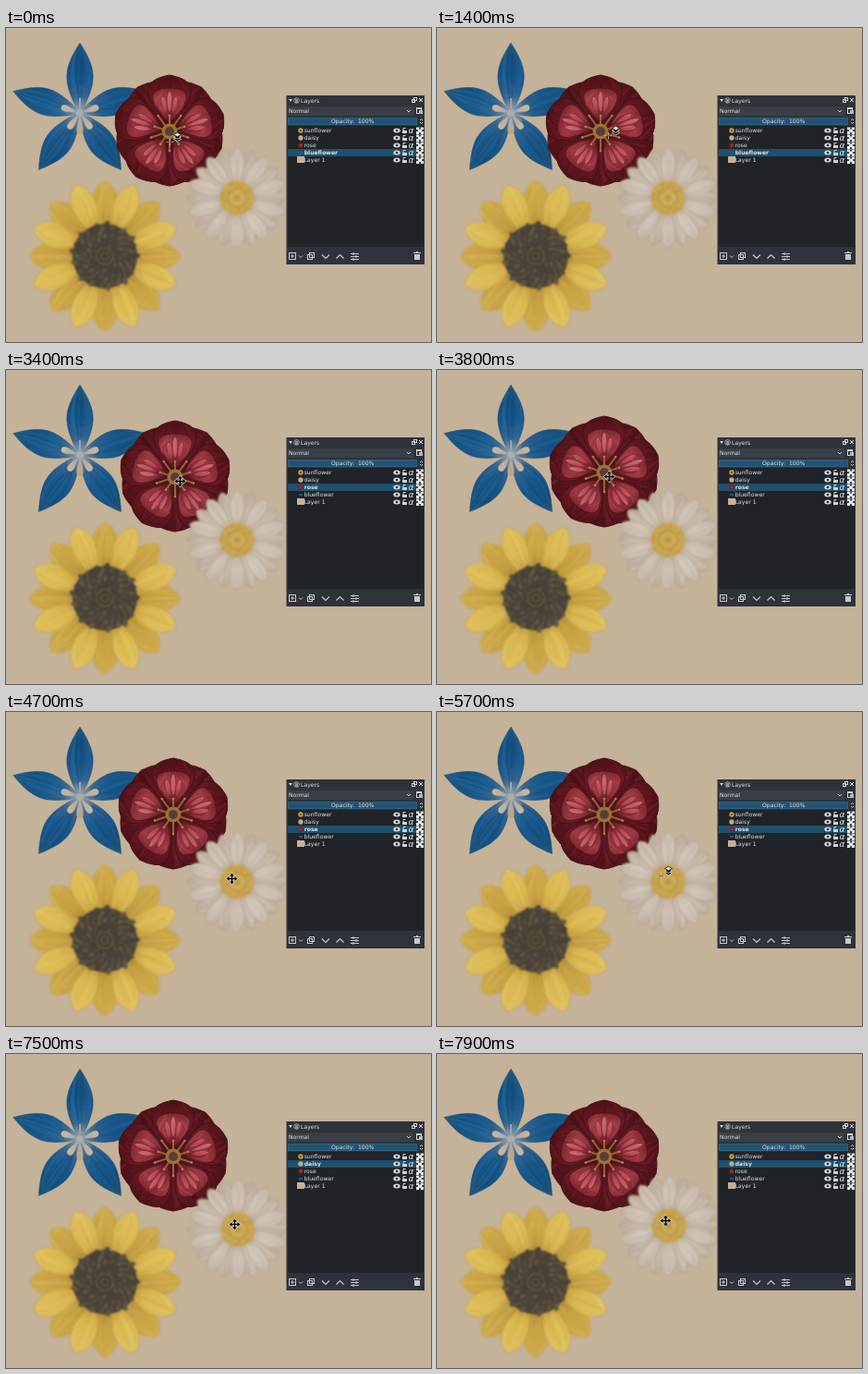
Write an HTML page with a canvas that moves like this. It is 460 px wide and 340 px high and loops after 8 s.

```html
<!DOCTYPE html>
<html lang="en">
<head>
<meta charset="utf-8">
<title>Picking and moving layers</title>
<style>
  html, body { margin: 0; width: 460px; height: 340px; overflow: hidden; background: #c4b299; }
  canvas { display: block; }
</style>
</head>
<body>
<canvas id="stage" width="460" height="340"></canvas>
<script>
const LOOP = 8000, STEP = 100, TAU = Math.PI * 2;
const ctx = document.getElementById('stage').getContext('2d');

let seed = 11;
const rnd = () => (seed = (seed * 16807) % 2147483647) / 2147483647;
const pick = list => list[Math.floor(rnd() * list.length)];

function sprite(paint, blur) {
  const c = document.createElement('canvas');
  c.width = c.height = 180;
  const g = c.getContext('2d');
  g.translate(90, 90);
  paint(g);
  const soft = c.cloneNode(), s = soft.getContext('2d');
  s.filter = `blur(${blur}px)`;
  s.drawImage(c, 0, 0);
  return soft;
}

function disc(g, x, y, r, color) {
  g.fillStyle = color;
  g.beginPath();
  g.arc(x, y, r, 0, TAU);
  g.fill();
}

function line(g, points, color, width = 1) {
  g.strokeStyle = color;
  g.lineWidth = width;
  g.beginPath();
  points.forEach(([x, y]) => g.lineTo(x, y));
  g.stroke();
}

function glow(g, r, color, clear) {
  const fill = g.createRadialGradient(0, 0, 0, 0, 0, r);
  fill.addColorStop(0, color);
  fill.addColorStop(1, clear);
  disc(g, 0, 0, r, fill);
}

// One brushed petal pointing away from the centre.
function petal(g, degrees, o) {
  const { from, to, width: w, k1 = .35, k2 = .3, neck = 0 } = o, len = to - from;
  g.save();
  g.rotate(degrees * Math.PI / 180);
  g.beginPath();
  g.moveTo(from, -neck);
  g.bezierCurveTo(from + len * k1, -w, to - len * k2, -w, to, 0);
  g.bezierCurveTo(to - len * k2, w, from + len * k1, w, from, neck);
  g.closePath();
  const fill = g.createLinearGradient(from, 0, to, 0);
  o.colors.forEach((c, i) => fill.addColorStop(i / (o.colors.length - 1), c));
  g.fillStyle = fill;
  g.fill();
  g.strokeStyle = o.edge;
  g.lineWidth = 1;
  g.stroke();
  g.clip();
  g.lineCap = 'round';
  for (let i = 0; i < o.strokes; i++) {
    const side = rnd() * 2 - 1;
    g.globalAlpha = .1 + rnd() * .25;
    g.strokeStyle = pick(o.brush);
    g.lineWidth = 1 + rnd() * 2;
    g.beginPath();
    g.moveTo(from + len * rnd() * .4, side * w * .3);
    g.quadraticCurveTo(from + len * .5, side * w, to - len * rnd() * .3, side * w * .35);
    g.stroke();
  }
  g.restore();
}

function ring(g, count, start, o) {
  for (let i = 0; i < count; i++) petal(g, start + i * 360 / count, o);
}

const blueflower = sprite(g => {
  ring(g, 5, -90, {
    from: 4, to: 76, width: 18.5, k1: .42, k2: .4, neck: 3,
    colors: ['#6b8093', '#2d6290', '#17568a', '#15507f', '#265878'],
    edge: 'rgba(40,84,115,.4)', strokes: 26,
    brush: ['#0e4475', '#1b639a', '#2e6f9c', '#1c4b74']
  });
  glow(g, 17, 'rgba(170,176,182,.95)', 'rgba(120,145,168,0)');
  for (const deg of [-18, 54, 126, 198]) {
    petal(g, deg, {
      from: 4, to: 21, width: 4.5, k1: .7, k2: 0,
      colors: ['#a5aaae', '#bfb1a0', '#cfb797'], edge: 'rgba(190,175,155,.4)', strokes: 0
    });
  }
  petal(g, 90, {
    from: 4, to: 23, width: 4.5, k1: .7, k2: 0,
    colors: ['#a5aaae', '#b9aa93', '#c2a36f'], edge: 'rgba(190,175,155,.4)', strokes: 0
  });
  line(g, [[0, -16], [0, -5]], '#9aa4ae', 2);
}, .7);

const rose = sprite(g => {
  ring(g, 5, -54, {
    from: 0, to: 59, width: 36, k1: .5, k2: .1,
    colors: ['#40101a', '#581a1f', '#5c171c', '#4e1217'], edge: '#4a1218', strokes: 22,
    brush: ['#3b0c14', '#8a333c', '#5c141c']
  });
  ring(g, 5, -90, {
    from: 6, to: 61, width: 31, k1: .6, k2: .1,
    colors: ['#4c111a', '#701d26', '#5f171d', '#4b1116'], edge: '#43101a', strokes: 20,
    brush: ['#82252f', '#420d15', '#6d1c25']
  });
  ring(g, 5, -90, {
    from: 11, to: 47, width: 24, k1: .65, k2: .02, neck: 2,
    colors: ['#6f1d29', '#8f3039', '#9a3841', '#7c262e'], edge: '#541620',
    strokes: 18, brush: ['#b9505a', '#701f29', '#a23d47']
  });
  for (const spread of [-11, 0, 11]) {
    ring(g, 5, -90 + spread, {
      from: 19, to: spread ? 39 : 44, width: 3.6, k1: .35, k2: .12,
      colors: ['#943541', '#b9505a', '#c8666d'], edge: 'rgba(120,35,46,.5)', strokes: 3,
      brush: ['#d27a7d', '#ad414d']
    });
  }
  glow(g, 24, 'rgba(64,17,20,.95)', 'rgba(90,25,32,0)');
  g.lineCap = 'round';
  for (let i = 0; i < 10; i++) {
    const a = i * TAU / 10 + TAU / 4, x = Math.cos(a), y = Math.sin(a), r = i % 2 ? 17 : 21;
    line(g, [[x * 7, y * 7], [x * r, y * r]], '#966330', 2);
    disc(g, x * r, y * r, 1.3, '#b08142');
  }
  disc(g, 0, 0, 8.5, '#9c7233');
  disc(g, 0, 0, 5, '#5a3c38');
}, .7);

const daisy = sprite(g => {
  const base = {
    from: 8, width: 10, k1: .55, k2: .1, edge: 'rgba(172,154,138,.5)', strokes: 10,
    brush: ['#d9cec1', '#bba99b', '#d2c5b7']
  };
  ring(g, 10, -72, { ...base, to: 54, colors: ['#b8a897', '#c4b5a6', '#bdab9a'] });
  ring(g, 10, -90, { ...base, to: 54, colors: ['#c0b19f', '#cfc3b6', '#c5b6a7'] });
  glow(g, 25, 'rgba(165,140,95,.9)', 'rgba(180,158,125,0)');
  disc(g, 0, 0, 18.5, '#c6a24e');
  for (let i = 0; i < 80; i++) {
    const a = i * 2.4, r = 2 * Math.sqrt(i);
    disc(g, Math.cos(a) * r, Math.sin(a) * r, 1.3, pick(['#ceac58', '#c09a45', '#c9a650']));
  }
  g.strokeStyle = '#b6934a';
  g.lineWidth = 1.2;
  g.beginPath();
  g.arc(0, 0, 10, 0, TAU);
  g.stroke();
  glow(g, 9, 'rgba(205,174,88,1)', 'rgba(205,174,88,.5)');
  disc(g, 0, 0, 3.5, '#bb984c');
}, .8);

const sunflower = sprite(g => {
  const base = { from: 22, k1: .5, k2: .16, edge: 'rgba(190,154,72,.5)', strokes: 20 };
  ring(g, 8, -90, {
    ...base, to: 82, width: 18, colors: ['#a9812f', '#c7a142', '#d0ae50'],
    brush: ['#bf983f', '#d9b95c', '#c7a044']
  });
  ring(g, 8, -67.5, {
    ...base, to: 83, width: 17, colors: ['#bb9038', '#d9b84f', '#dfc162'],
    brush: ['#e5ca6f', '#cfaa47', '#dfc05a']
  });
  glow(g, 41, 'rgba(110,84,42,1)', 'rgba(150,115,50,0)');
  disc(g, 0, 0, 35, '#474037');
  for (let i = 5; i < 95; i++) {
    const r = 3.6 * Math.sqrt(i);
    g.save();
    g.rotate(i * 2.39996);
    g.translate(r, 0);
    g.rotate(.5);
    g.scale(1.6, 1);
    disc(g, 0, 0, 1.2 + r / 24, pick(['#5f563f', '#554c3e', '#4b4339']));
    g.restore();
  }
  glow(g, 18, 'rgba(72,62,48,.9)', 'rgba(70,60,45,0)');
  g.strokeStyle = '#6b5f47';
  g.lineWidth = 1.2;
  for (const r of [4, 9]) {
    g.beginPath();
    g.arc(0, 0, r, 0, TAU);
    g.stroke();
  }
}, .8);

const layers = ['sunflower', 'daisy', 'rose', 'blueflower', 'Layer 1'];
const thumbs = ['#c9a343', '#b9ac9c', '#7e2029', '#1c5789', '#c4b299'];

function label(text, x, y, bold) {
  ctx.font = (bold ? 'bold ' : '') + '6.1px "DejaVu Sans", sans-serif';
  ctx.fillStyle = '#e0e2e4';
  ctx.fillText(text, x, y);
}
function box(x, y, w, h, color) {
  ctx.fillStyle = color;
  ctx.fillRect(x, y, w, h);
}
function frame(x, y, w, h, color = '#d0d3d6') {
  ctx.strokeStyle = color;
  ctx.lineWidth = 1;
  ctx.strokeRect(x + .5, y + .5, w - 1, h - 1);
}

function rowIcons(y) {
  ctx.fillStyle = '#d6d9dc';
  ctx.beginPath();
  ctx.ellipse(423, y, 3.7, 2.5, 0, 0, TAU);
  ctx.fill();
  disc(ctx, 423, y, 1.3, '#25292d');
  box(429, y, 5, 3, '#d0d3d6');
  line(ctx, [[430, y], [430, y - 2.5], [432.5, y - 2.5]], '#d0d3d6');
  ctx.font = 'italic 9px "DejaVu Sans", sans-serif';
  ctx.fillStyle = '#e6e8ea';
  ctx.fillText('α', 435.5, y + 3);
  box(444, y - 3.5, 8, 7.5, '#e4e6e7');
  for (const [dx, dy] of [[3, -3.5], [0, -1], [6, -1], [3, 2]]) {
    box(444 + dx, y + dy, 2, 2, '#3f454b');
  }
}

function panel(selected) {
  box(303.5, 73, 149.5, 183, '#2e323a');
  box(305, 106, 147, 131, '#202428');

  ctx.fillStyle = '#d0d3d6';
  ctx.beginPath();
  ctx.moveTo(306, 77);
  ctx.lineTo(310, 77);
  ctx.lineTo(308, 80);
  ctx.fill();
  ctx.strokeStyle = '#b9bdc1';
  ctx.lineWidth = .8;
  ctx.beginPath();
  ctx.arc(314.5, 78.5, 2.8, 0, TAU);
  ctx.stroke();
  box(313, 77, 3, 4, '#8d9196');
  label('Layers', 319, 81);
  frame(441, 75, 4, 4);
  frame(439, 77, 4, 4);
  line(ctx, [[447, 76], [451, 80]], '#e0e2e4');
  line(ctx, [[451, 76], [447, 80]], '#e0e2e4');

  box(305, 85, 136, 10, '#3a3f46');
  label('Normal', 306, 92);
  line(ctx, [[434, 89], [436, 91], [438, 89]], '#c9cdd0');
  frame(444, 86, 6, 7);
  box(444, 86, 6, 2, '#d0d3d6');
  box(447, 89, 4, 4, '#b4b8bc');

  box(305, 97, 140, 8, '#245372');
  frame(305, 97, 140, 8, '#2b5f7d');
  label('Opacity:  100%', 352, 103.2);
  line(ctx, [[448, 100], [449.5, 98.5], [451, 100]], '#c9cdd0');
  line(ctx, [[448, 102], [449.5, 103.5], [451, 102]], '#c9cdd0');

  layers.forEach((name, i) => {
    const y = 111 + i * 8, on = name === selected;
    if (on) box(305, y - 4, 147, 8, '#1f506c');
    if (i === 4) {
      box(315, y - 4, 8, 7, thumbs[i]);
    } else if (i === 3) {
      box(317, y - 1, 4, 2, thumbs[i]);
    } else {
      disc(ctx, 319, y, 2.7, thumbs[i]);
      disc(ctx, 319, y, 1, ['#4b4238', '#c9a84f', '#a43a45'][i]);
    }
    label(name, 322.7, y + 2.2, on);
    rowIcons(y);
  });

  const ink = '#c6cacd';
  frame(306, 243, 8, 8, ink);
  line(ctx, [[308, 247], [312, 247]], ink);
  line(ctx, [[310, 245], [310, 249]], ink);
  line(ctx, [[317, 246.5], [319, 248.5], [321, 246.5]], ink);
  frame(328, 243, 6, 6, ink);
  frame(326, 245, 6, 6, ink);
  line(ctx, [[342, 245.5], [346, 249.5], [350, 245.5]], ink, 1.2);
  line(ctx, [[357.5, 249.5], [361.5, 245.5], [365.5, 249.5]], ink, 1.2);
  [244.5, 247.5, 250.5].forEach((y, i) => {
    line(ctx, [[373, y], [382, y]], ink);
    box(375 + (i % 2) * 3, y - 1, 2, 2, ink);
  });
  box(442, 245, 6, 6, ink);
  box(441, 243, 8, 1, ink);
  box(444, 242, 2, 1, ink);
}

const moveIcon = new Path2D('M0-6L2.5-3H.8V-.8H3V-2.5L6 0L3 2.5V.8H.8V3H2.5L0 6L-2.5 3H-.8V.8H-3V2.5L-6 0L-3-2.5V-.8H-.8V-3H-2.5Z');

function cursor(x, y, picking) {
  ctx.save();
  ctx.translate(x + .5, y + .5);
  if (picking) {
    line(ctx, [[-4, 0], [4, 0]], 'rgba(225,215,200,.6)');
    line(ctx, [[0, -4], [0, 4]], 'rgba(225,215,200,.6)');
    line(ctx, [[-2, 0], [2, 0]], '#6d6253');
    ctx.lineWidth = .8;
    for (const dy of [-3, -5.5, -8]) {
      ctx.beginPath();
      [[4, dy], [8, dy - 2.3], [12, dy], [8, dy + 2.3]].forEach(p => ctx.lineTo(...p));
      ctx.closePath();
      ctx.fillStyle = dy === -8 ? '#e8e5df' : '#15130f';
      ctx.fill();
      ctx.strokeStyle = dy === -8 ? '#15130f' : '#e8e5df';
      ctx.stroke();
    }
  } else {
    ctx.strokeStyle = 'rgba(233,230,223,.8)';
    ctx.lineWidth = 1.3;
    ctx.stroke(moveIcon);
    ctx.fillStyle = '#0c0b0a';
    ctx.fill(moveIcon);
  }
  ctx.restore();
}

// Keys are [time, x, y]; positions snap to whole pixels.
const path = [
  [0, 177, 123], [200, 181, 115], [300, 181, 115], [500, 184, 109], [700, 183, 119],
  [900, 183, 119], [1200, 181, 115], [1400, 185, 116], [2200, 185, 116], [2300, 184, 116],
  [2800, 184, 116], [2900, 182, 116], [3400, 188, 120], [3600, 187, 112], [3800, 186, 115],
  [4500, 243, 180], [4600, 243, 180], [5000, 249, 177], [5400, 243, 177], [5700, 242, 177],
  [6600, 243, 177], [7000, 246, 178], [7500, 247, 184], [7900, 247, 180]
];

function pointer(t) {
  const i = path.findIndex(k => k[0] > t);
  if (i < 0) return path.at(-1).slice(1);
  const a = path[i - 1], b = path[i], p = (t - a[0]) / (b[0] - a[0]);
  const eased = p * p * (3 - 2 * p);
  return [1, 2].map(n => Math.round(a[n] + (b[n] - a[n]) * eased));
}

// Offset of a layer that follows the pointer between two times.
function drag(t, start, end) {
  const from = pointer(start), to = pointer(Math.min(Math.max(t, start), end));
  return [to[0] - from[0], to[1] - from[1]];
}

function put(image, x, y, [dx, dy] = [0, 0]) {
  ctx.drawImage(image, x - 90 + dx, y - 90 + dy);
}

function draw(now) {
  const t = Math.floor((now % LOOP) / STEP) * STEP;
  box(0, 0, 460, 340, '#c4b299');
  put(blueflower, 80, 92);
  put(rose, 177, 112, drag(t, 2900, 3800));
  put(daisy, 250, 184, drag(t, 7000, 7900));
  put(sunflower, 107, 247);
  panel(t < 2200 ? 'blueflower' : t < 6200 ? 'rose' : 'daisy');
  cursor(...pointer(t), t < 2300 || (t >= 5600 && t < 6300));
  requestAnimationFrame(() => draw(performance.now()));
}
draw(performance.now());
</script>
</body>
</html>
```
